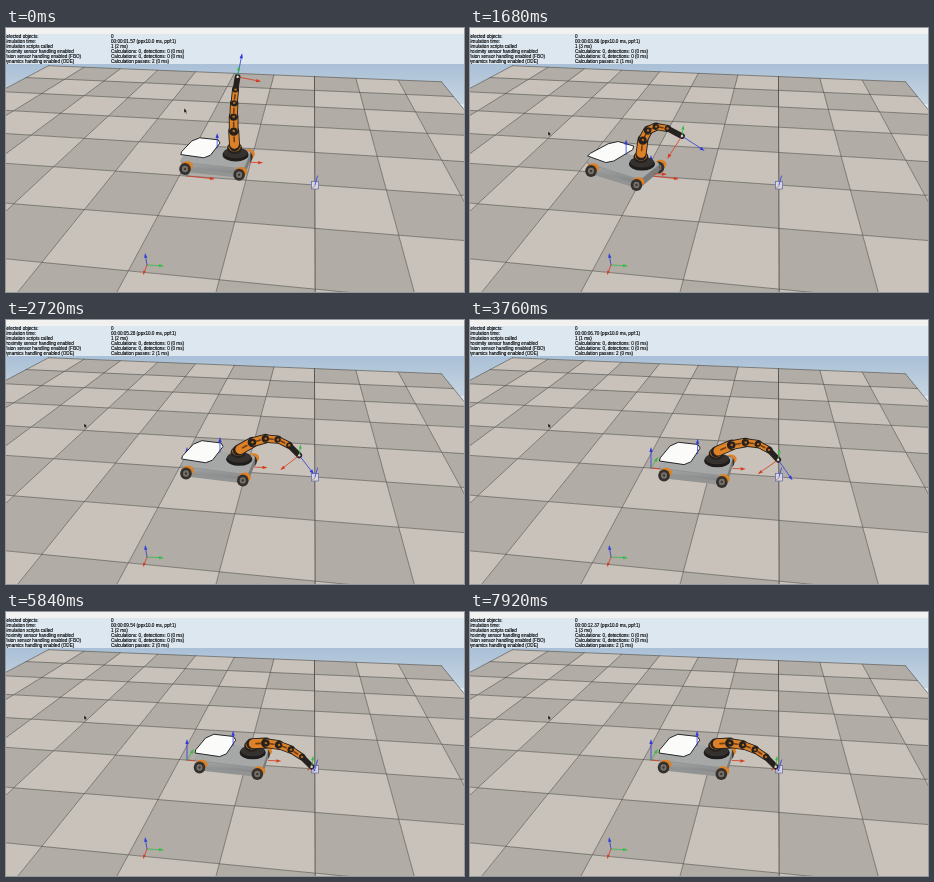
An HTML page that plays this animation: 458 px wide and 264 px high, repeating every 8 s.

```html
<!DOCTYPE html>
<html lang="en">
<head>
<meta charset="utf-8">
<title>Mobile robot simulation</title>
<style>
html, body { margin: 0; width: 100%; height: 100%; overflow: hidden; background: #bcb8b1; }
svg { display: block; width: 458px; height: 264px; }
text { font: 4.6px "Liberation Sans", Arial, sans-serif; fill: #000; stroke: #000; stroke-width: .12; white-space: pre; }
</style>
</head>
<body>
<svg viewBox="0 0 458 264">
  <defs>
    <linearGradient id="sky" x1="0" y1="0" x2="0" y2="1">
      <stop offset="0" stop-color="#aac0d7"/>
      <stop offset="1" stop-color="#c6d4e1"/>
    </linearGradient>
    <linearGradient id="side" x1="0" y1="0" x2="0" y2="1">
      <stop offset="0" stop-color="#a9aaaa"/>
      <stop offset="1" stop-color="#7d7e7f"/>
    </linearGradient>
  </defs>
  <rect width="458" height="264" fill="#dde7f0"/>
  <rect width="458" height="6" fill="#f1f1f0"/>
  <rect y="36" width="458" height="40" fill="url(#sky)"/>
  <g id="floor"></g>
  <g id="scene"></g>
  <g id="info"></g>
</svg>
<script>
const LOOP = 8000, STEP = 80;
const BLUE = '#2f39dc', RED = '#d8391f', GREEN = '#32bd45';
const ORANGE = '#dc8128', DARK = '#25211e';

const $ = id => document.getElementById(id);
const add = (p, q, k = 1) => [p[0] + q[0] * k, p[1] + q[1] * k];
const mix = (a, b, f) => a.map((n, i) => n + (b[i] - n) * f);
const pt = p => p.map(n => n.toFixed(2)).join(',');
const poly = (pts, fill, extra = '') => `<polygon points="${pts.map(pt).join(' ')}" fill="${fill}" ${extra}/>`;
const line = (a, b, color, w = 1) =>
  `<path d="M${pt(a)}L${pt(b)}" stroke="${color}" stroke-width="${w}" stroke-linecap="round" fill="none"/>`;
const oval = (c, rx, ry, fill) =>
  `<ellipse cx="${c[0].toFixed(2)}" cy="${c[1].toFixed(2)}" rx="${rx}" ry="${ry}" fill="${fill}"/>`;

// Floor perspective: u counts tiles to the left, v tiles away from the camera.
const ORIGIN = [308.8, 157], HORIZON = -103, LEFT = -3406, AHEAD = 308, U = 0.0189, V = 0.143;

function ground(u, v) {
  const a = u * U, b = v * V, d = 1 + a + b;
  return [(ORIGIN[0] + LEFT * a + AHEAD * b) / d, (ORIGIN[1] + HORIZON * (a + b)) / d];
}
function toGround([x, y]) {
  const d = (ORIGIN[1] - HORIZON) / (y - HORIZON);
  const a = (x * d - ORIGIN[0] - AHEAD * (d - 1)) / (LEFT - AHEAD);
  return [a / U, (d - 1 - a) / V];
}

function drawFloor() {
  let out = '';
  for (let v = 4; v >= -3; v--)
    for (let u = -3; u < 7; u++) {
      const fill = (u + v + 20) % 2 ? '#b1aca5' : '#c8c2ba';
      out += poly([ground(u, v), ground(u + 1, v), ground(u + 1, v + 1), ground(u, v + 1)], fill);
    }
  for (let u = -3; u <= 7; u++) out += line(ground(u, -3), ground(u, 5), '#504d49', u ? 0.6 : 0.9);
  for (let v = -3; v <= 5; v++) out += line(ground(-3, v), ground(7, v), '#504d49', 0.6);
  $('floor').innerHTML = out;
}

// Key poses: rear wheel on screen, heading in degrees, arm tip and bend from the shoulder, axis length.
const POSES = [
  { t: 0, wheel: [179, 141], turn: [4], tip: [3, -69], bend: [-3, -38], axis: [24] },
  { t: 1680, wheel: [121, 143], turn: [20], tip: [41, -19], bend: [1, -45], axis: [27] },
  { t: 2720, wheel: [180, 153.5], turn: [5], tip: [61, 5], bend: [37, -26], axis: [24] },
  { t: 3360, wheel: [194, 155.5], turn: [4], tip: [62, 8], bend: [41, -22], axis: [25] },
  { t: 3840, wheel: [194, 155.5], turn: [4], tip: [62, 8], bend: [41, -22], axis: [25] },
  { t: 4560, wheel: [193.5, 155.5], turn: [4], tip: [62, 13], bend: [41, -20], axis: [24] },
  { t: 5600, wheel: [193.5, 155.5], turn: [4], tip: [60, 23], bend: [37, -5], axis: [6] }
];

function poseAt(t) {
  const i = POSES.findIndex(p => p.t > t);
  if (i < 0) return POSES[POSES.length - 1];
  const a = POSES[i - 1], b = POSES[i], f = (t - a.t) / (b.t - a.t);
  const pose = {};
  for (const key of ['wheel', 'turn', 'tip', 'bend', 'axis']) pose[key] = mix(a[key], b[key], f);
  return pose;
}

// Point on the robot: a along and b across the wheelbase, h pixels up.
function robotFrame(pose) {
  const [u, v] = toGround(pose.wheel), turn = pose.turn[0] * Math.PI / 180;
  const c = Math.cos(turn), s = Math.sin(turn), length = 0.85, width = 0.56;
  return (a, b, h = 0) => add(
    ground(u - a * length * c - b * width * s, v - a * length * s + b * width * c), [0, -h]);
}

function arrow(from, vec, color) {
  const len = Math.hypot(...vec), dir = [vec[0] / len, vec[1] / len], tip = add(from, vec);
  const size = Math.min(5, len * 0.4), neck = add(tip, dir, -size), side = [-dir[1], dir[0]];
  return line(from, neck, color, 0.8) +
    poly([tip, add(neck, side, size * 0.33), add(neck, side, -size * 0.33)], color);
}

function markers() {
  const base = [181, 148], corner = [141, 237];
  return arrow(corner, [-2, -12], BLUE) + arrow(corner, [17, 1], GREEN) + arrow(corner, [-4, 10], RED) +
    arrow(base, [0, -21], BLUE) + arrow(base, [28, 3], RED) + arrow(base, [7, -11], GREEN) +
    '<rect x="305.5" y="153.5" width="7" height="7.5" fill="#d5d6df" stroke="#6c70a2" stroke-width=".8"/>' +
    line([309, 157], [311.5, 148], BLUE, 0.8) + line([309, 158], [306, 160], '#b56058', 0.6);
}

function wheel(c) {
  return oval(add(c, [2, -3]), 6, 4.8, ORANGE) + oval(c, 5.8, 6, '#34302d') +
    oval(c, 3, 3.2, '#77716b') + oval(c, 1.2, 1.3, '#3d3834');
}

function chassis(at) {
  const round = color => `stroke="${color}" stroke-width="4" stroke-linejoin="round"`;
  const shoulder = at(0.85, 0.55, 11);
  const plate = [[-0.08, 0], [0.36, -0.04], [0.45, 0.12], [0.5, 0.85], [0.43, 1.03], [0.06, 1.04], [-0.05, 0.8], [-0.1, 0.15]];
  return wheel(at(0, 1)) + wheel(at(1, 1)) +
    poly([at(1.06, 0.05, 0), at(1.06, 0.05, 7), at(1.06, 0.8, 7), at(1.06, 0.8, 1)], '#7b7c7c', round('#7b7c7c')) +
    poly([at(-0.05, 0, 8), at(1.04, 0, 8), at(1.06, 0, -1), at(0.05, 0, -1)], 'url(#side)', round('#929393')) +
    poly([at(-0.05, 0.04, 8), at(1.06, 0.04, 8), at(1.06, 0.78, 8), at(-0.05, 0.78, 8)], '#a6a7a7', round('#a6a7a7')) +
    wheel(at(0, 0)) + wheel(at(1, 0)) +
    poly(plate.map(([a, b]) => at(a, b, 14)), '#fbfbf9', 'stroke="#24282b" stroke-linejoin="round"') +
    arrow(at(0.5, 0.55, 14), [0, -15], BLUE) + arrow(at(1.13, 0.5, 4), [13, 0.5], RED) +
    oval(add(shoulder, [0, 2]), 13, 6.5, '#1e1d1c') + oval(shoulder, 12, 5.5, '#34312e');
}

// The arm follows a curve from shoulder to tip, cut into tapering links.
function arm(at, pose) {
  const LINKS = 5, start = add(at(0.85, 0.55, 11), [-1, -7]);
  const bend = add(start, pose.bend), tip = add(start, pose.tip);
  const curve = f => mix(mix(start, bend, f), mix(bend, tip, f), f);
  let out = oval(add(start, [0, 2]), 7.5, 6, DARK) + oval(add(start, [0, 1]), 6, 4.6, ORANGE), joints = '';
  for (let i = 0; i < LINKS; i++) {
    const a = curve(i / LINKS), b = curve((i + 1) / LINKS), w = 11 - i * 1.3;
    out += line(a, b, DARK, w);
    if (i < LINKS - 1) {
      out += line(mix(a, b, 0.12), mix(a, b, 0.82), ORANGE, w - 1.8);
      out += line(mix(a, b, 0.3), mix(a, b, 0.6), '#6f3d14', 1.6);
      joints += oval(b, w * 0.34, w * 0.32, DARK) + oval(b, 1.3, 1.2, '#bd691d');
    }
  }
  const dx = tip[0] - bend[0], dy = tip[1] - bend[1], k = pose.axis[0] / Math.hypot(dx, dy);
  return out + joints + arrow(tip, [-dy * k, dx * k], RED) + arrow(tip, [dx * k, dy * k], BLUE) +
    arrow(tip, [1.5, -11], GREEN) + oval(tip, 1.2, 1.2, '#d8d8d4');
}

function cursor(t) {
  const p = mix([178, 80], [78, 103], Math.min(1, t / 880));
  const shape = [[0, 0], [0, 5], [1.2, 4], [2.3, 6], [3, 5.6], [2, 3.6], [3.5, 3.5]];
  return poly(shape.map(q => add(p, q)), '#1b1b1b', 'stroke="#eee" stroke-width=".3"');
}

function info(t) {
  const clock = (1.57 + t * 0.001364).toFixed(2).padStart(5, '0');
  const load = Math.sin(t / 950);
  const sensor = 'Calculations: 0, detections: 0 (0 ms)';
  const rows = [
    ['Selected objects:', '0'],
    ['Simulation time:', `00:00:${clock} (ppx10.0 ms, ppf:1)`],
    ['Simulation scripts called', `1 (${2 + Math.round(load)} ms)`],
    ['Proximity sensor handling enabled', sensor],
    ['Vision sensor handling enabled (FBO)', sensor],
    ['Dynamics handling enabled (ODE)', `Calculation passes: 2 (${load > 0.2 ? 1 : 0} ms)`]
  ];
  return rows.map(([name, value], i) => {
    const y = 9.5 + i * 5;
    return `<text x="-2.5" y="${y}">${name}</text><text x="105" y="${y}">${value}</text>`;
  }).join('');
}

function draw(now) {
  const t = Math.floor((now % LOOP) / STEP) * STEP;
  const pose = poseAt(t), at = robotFrame(pose);
  $('scene').innerHTML = markers() + chassis(at) + arm(at, pose) + cursor(t);
  $('info').innerHTML = info(t);
}

function tick(now) {
  draw(now);
  requestAnimationFrame(tick);
}

drawFloor();
draw(0);
requestAnimationFrame(tick);
</script>
</body>
</html>
```
